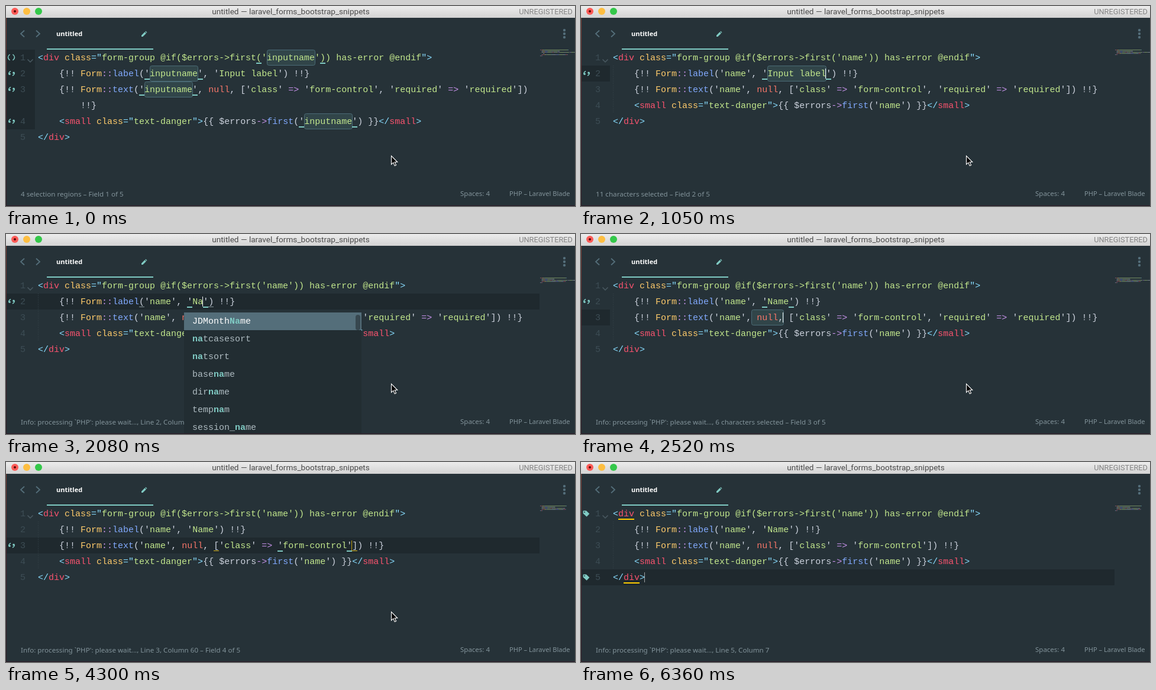
An HTML page that plays this animation: 962x339 px, repeating every 6460 ms.

```html
<!DOCTYPE html>
<html lang="en">
<head>
<meta charset="utf-8">
<title>Snippet fields in an editor</title>
<style>
html, body { margin: 0; width: 100%; height: 100%; overflow: hidden; background: #263238; }
svg { display: block; width: 962px; height: 339px; }
text { white-space: pre; }
.code { font: 15px "Liberation Mono", "Noto Sans Mono", monospace; fill: #cdd3de; }
.num { fill: #3d4d55; }
.ui { font: 11.65px "Noto Sans", "Open Sans", sans-serif; fill: #82939a; }
.bar { font: 13.6px Roboto, Inter, sans-serif; fill: #4b4b4b; }
.c { fill: #89ddff; } .r { fill: #f9536e; } .y { fill: #ffcb6b; } .g { fill: #c3e88d; }
.p { fill: #c792ea; } .b { fill: #82aaff; } .o { fill: #f77669; } .w { fill: #cdd3de; }
.teal { fill: #80cbc4; }
.hit { fill: #80cbc4; font-weight: bold; }
.sel { fill: #314549; stroke: #4b6b76; }
.line { fill: none; stroke: #546e7a; stroke-width: 1.8; }
</style>
</head>
<body>
<svg viewBox="0 0 962 339" xmlns="http://www.w3.org/2000/svg">
  <defs>
    <linearGradient id="chrome" x2="0" y2="1">
      <stop stop-color="#ececec"/><stop offset="1" stop-color="#d3d3d3"/>
    </linearGradient>
    <linearGradient id="edge" x2="0" y2="1">
      <stop stop-color="#7a3a30"/><stop offset="0.4" stop-color="#4a2028"/><stop offset="1" stop-color="#2a1824"/>
    </linearGradient>
    <g id="round" fill="none" stroke="#80cbc4" stroke-width="1.6">
      <path d="M6.5 8Q0.5 13 6.5 18M11.5 8Q17.5 13 11.5 18"/>
    </g>
    <g id="quote">
      <path d="M8 9.500Q4.700 11 4.700 14M11 17Q14.300 15.500 14.300 12.500" fill="none" stroke="#80cbc4" stroke-width="1.400"/>
      <circle class="teal" cx="6" cy="14.300" r="1.800"/><circle class="teal" cx="13" cy="12.200" r="1.800"/>
    </g>
    <g id="tag">
      <path class="teal" d="M3.500 9.500q0-1 1-1h4.300l5.500 5.300-4.700 4.900-6.100-5.400Z"/>
      <circle cx="6" cy="11" r="1" fill="#263238"/>
    </g>
  </defs>
  <rect width="962" height="339" fill="#263238"/>
  <rect width="962" height="20" fill="url(#chrome)"/>
  <circle cx="15" cy="9" r="6" fill="#fc5b57"/><circle cx="15" cy="9" r="2" fill="#5c0a08"/>
  <circle cx="35" cy="9" r="6" fill="#fdbe41"/>
  <circle cx="55" cy="9" r="6" fill="#34c84a"/>
  <text class="bar" x="481.500" y="14" text-anchor="middle">untitled — laravel_forms_bootstrap_snippets</text>
  <text class="bar" x="958" y="13.500" text-anchor="end" style="font-size:12.800px;fill:#858585">UNREGISTERED</text>
  <path class="line" d="M31 41.500L25 47L31 52.500M51 41.500L57 47L51 52.500"/>
  <text class="ui" x="85" y="51" style="font-size:11px;font-weight:600;fill:#fff">untitled</text>
  <path class="teal" d="M229 52v-2.300l5.600-5.600 2.300 2.300-5.600 5.600ZM235.300 43.400l.9-.9 2.300 2.300-.9.900Z"/>
  <rect class="teal" x="69" y="72" width="180" height="2"/>
  <g fill="#546e7a">
    <circle cx="944" cy="41" r="2.200"/><circle cx="944" cy="47" r="2.200"/><circle cx="944" cy="53" r="2.200"/>
  </g>
  <text class="ui" x="768" y="322" style="font-size:11.500px">Spaces: 4</text>
  <text class="ui" x="851" y="322" style="font-size:11.100px">PHP – Laravel Blade</text>
  <g id="view"></g>
  <rect y="20" width="1" height="319" fill="url(#edge)"/>
  <rect y="338" width="962" height="1" fill="#2a1824"/>
  <path id="mouse" d="M651.500 254v14.500l3.300-3.100 2.400 5.400 2.400-1-2.400-5.300h4.500Z" fill="#000" stroke="#fff" stroke-width="1.100"/>
</svg>
<script>
const LOOP = 6460, LEFT = 54, TOP = 74, CH = 9, ROW = 27, MINI = 0.65;
const INFO = "Info: processing `PHP': please wait..., ";
const NAME_COLS = [43, 21, 20, 50];
const YELLOW = '#d9b51c', GOLD = '#ffcc00', TEAL = '#80cbc4', GREY = '#87959b', WHITE = '#f4f6f7';
const view = document.getElementById('view');
const mouse = document.getElementById('mouse');

const esc = s => s.replace(/&/g, '&amp;').replace(/</g, '&lt;');
const px = col => LEFT + col * CH;
const py = row => TOP + row * ROW;
const rect = (x, y, w, h, attr) => `<rect x="${x}" y="${y}" width="${w}" height="${h}" ${attr}/>`;

// Each part of a line starts with the letter of its colour.
const parse = s => s.split('|').map(p => [p[0], p.slice(1)]);
const str = s => `w'|g${s}|w'`;

function codeLines({ name, label, req }) {
  const extra = req ? `|w, |${str('required')}|p => |${str('required')}` : '';
  const wrap = name === 'inputname';
  const rows = [
    `c<|rdiv|y class|c="|gform-group @if($errors->first('${name}')) has-error @endif|c">`,
    `w    {!! |yForm|p::|blabel|w(|${str(name)}|w, |${str(label)}|w) !!}`,
    `w    {!! |yForm|p::|btext|w(|${str(name)}|w, |onull|w, [|${str('class')}|p => |${str('form-control')}${extra}|w])` + (wrap ? '' : ' !!}'),
    `w    |c<|rsmall|y class|c="|gtext-danger|c">|w{{ $errors|p->|bfirst|w(|${str(name)}|w) }}|c</|rsmall|c>`,
    'c</|rdiv|c>'
  ];
  if (wrap) rows.splice(3, 0, 'w        !!}');
  return rows.map(parse);
}

function minimap(lines) {
  let out = '';
  lines.forEach((parts, row) => {
    let col = 0;
    for (const [color, s] of parts) {
      const pad = s.length - s.trimStart().length;
      out += rect(903 + (col + pad) * MINI, 74 + row * 2, (s.length - pad) * MINI, 1, `class="${color}" opacity=".5"`);
      col += s.length;
    }
  });
  return out;
}

function popup({ query, items }) {
  let out = rect(301, 133, 300, 206, 'fill="#222d32"') + rect(301, 133, 300, 30, 'fill="#546e7a"')
    + rect(591, 137, 8, 26, 'rx="4" fill="#37474f"');
  items.forEach((item, i) => {
    let at = item.indexOf(query);
    if (at < 0) at = item.indexOf(query.toLowerCase());
    const end = at + query.length;
    out += `<text class="code" x="315" y="${152 + i * 30}" style="fill:${i ? '#aebbc1' : '#fff'}">`
      + `${item.slice(0, at)}<tspan class="hit">${item.slice(at, end)}</tspan>${item.slice(end)}</text>`;
  });
  return out;
}

function draw(s) {
  const lines = codeLines(s), wrapped = lines.length > 5;
  let out = '';
  if (s.band) {
    const [row, count, full] = s.band;
    out += rect(0, py(row), full ? 902 : 49, count * ROW, 'fill="#1f292e"');
  }
  if (!wrapped) out += `<path d="M54.500 101V182" stroke="#35434a" stroke-dasharray="1 2"/>`;
  for (const [row, col, len] of s.sel || [])
    out += rect(px(col) + 0.5, py(row) + 0.5, len * CH, 26, 'rx="3" class="sel"');
  let num = 0;
  lines.forEach((parts, row) => {
    const y = py(row) + 18;
    if (!(wrapped && row === 3)) out += `<text class="code num" x="24" y="${y}">${++num}</text>`;
    out += `<text class="code" x="${LEFT}" y="${y}">`
      + parts.map(([c, t]) => `<tspan class="${c}">${esc(t)}</tspan>`).join('') + '</text>';
  });
  out += '<path d="M36.500 90.500L41 95L45.500 90.500" fill="none" stroke="#4a5a62" stroke-width="1.500"/>';
  for (const [row, col, color = TEAL, len = 1, thick = 2] of s.marks || [])
    out += rect(px(col), py(row) + 22, len * CH, thick, `fill="${color}"`);
  for (const [row, id] of s.icons || []) out += `<use href="#${id}" y="${py(row)}"/>`;
  for (const [row, col, color = WHITE, alpha = 1] of s.carets || [])
    out += rect(px(col) - 1, py(row) + 5, 1, 17, `fill="${color}" opacity="${alpha}"`);
  out += minimap(lines) + `<text class="ui" x="25" y="323">${s.status}</text>`;
  if (s.popup) out += popup(s.popup);
  view.innerHTML = out;
  mouse.style.display = s.noMouse ? 'none' : '';
}

const fourIcons = last => [[0, 'round'], [1, 'quote'], [2, 'quote'], [last, 'quote']];

// All four name fields at once, either selected or with carets after the typed text.
function multi(name, picked) {
  const rows = picked ? [0, 1, 2, 4] : [0, 1, 2, 3], n = name.length;
  const marks = [], sel = [], carets = [];
  rows.forEach((row, i) => {
    const col = NAME_COLS[i], gap = i ? 1 : 2;
    marks.push([row, col - gap], [row, col + n + gap - 1]);
    if (picked) sel.push([row, col, n]);
    else carets.push([row, col + n, GOLD]);
  });
  return { name, label: 'Input label', req: true, marks, sel, carets, icons: fourIcons(rows[3]),
    band: [0, picked ? 5 : 4, !picked], status: '4 selection regions – Field 1 of 5' };
}

const label = {
  name: 'name', label: 'Input label', req: true, band: [1, 1], sel: [[1, 29, 11]],
  carets: [[1, 40]], status: '11 characters selected – Field 2 of 5'
};
const quote = row => [[row, 'quote']];

function typed(text, items) {
  const end = 29 + text.length;
  return {
    name: 'name', label: text, req: true, band: [1, 1, true], carets: [[1, end]], icons: quote(1),
    marks: [[1, 28], [1, end], [1, 19, GREY, 1, 1], [1, end + 1, GREY, 1, 1]],
    status: `${items ? INFO : ''}Line 2, Column ${end + 1} – Field 2 of 5`,
    popup: items && { query: text, items: items.split(' ') }
  };
}

const done = { name: 'name', label: 'Name', req: true };
const nullField = {
  ...done, band: [2, 1], sel: [[2, 26, 6]], carets: [[2, 32]], icons: quote(1),
  marks: [[1, 28], [1, 33]], status: INFO + '6 characters selected – Field 3 of 5'
};
const reqField = {
  ...done, band: [2, 1], sel: [[2, 59, 26]], carets: [[2, 85]], icons: quote(1),
  status: INFO + '26 characters selected – Field 4 of 5'
};
const reqMarks = { icons: quote(2), marks: [[2, 75], [2, 84], [2, 33, YELLOW, 1, 1], [2, 85, YELLOW, 1, 1]] };

const cut = (alpha, lit = true) => ({
  ...done, req: false, band: [2, 1, true], carets: [[2, 59, GOLD, alpha]], icons: quote(2),
  marks: lit ? [[2, 45], [2, 58], [2, 33, YELLOW, 1, 1], [2, 59, YELLOW, 1, 1]] : [],
  status: INFO + 'Line 3, Column 60 – Field 4 of 5'
});
const last = alpha => ({
  ...done, req: false, band: [4, 1, true], carets: [[4, 6, WHITE, alpha]],
  icons: [[0, 'tag'], [4, 'tag']], marks: [[0, 1, GOLD, 3], [4, 2, GOLD, 3]],
  status: INFO + 'Line 5, Column 7'
});

const forN = 'hw_New_Document JDMonthName natcasesort natsort next ngettext nl2br';
const forNa = 'JDMonthName natcasesort natsort basename dirname tempnam session_name';
const forNam = 'JDMonthName basename dirname tempnam php_uname session_name posix_ttyname';
const forName = 'JDMonthName basename dirname php_uname session_name posix_ttyname session_module_name';

const steps = [
  [0, multi('inputname', true)],
  [150, multi('n')], [300, multi('na')], [450, multi('nam')], [600, multi('name')],
  [900, { ...label, icons: fourIcons(3) }],
  [1050, { ...label, icons: quote(1), marks: [[1, 28], [1, 40]] }],
  [1500, typed('N')], [1640, typed('N', forN)],
  [1940, typed('Na', forNa)], [2090, typed('Nam', forNam)], [2230, typed('Name', forName)],
  [2520, nullField], [2970, reqField], [3120, { ...reqField, ...reqMarks }],
  [3570, cut(1, false)], [3720, cut(1)], [3860, cut(0.6)], [4010, cut(0.2)], [4150, cut(0)], [4300, cut(0.7)],
  [4450, last(1)],
  [4750, last(0.6)], [4900, last(0.2)], [5040, last(0)], [5190, last(0.2)], [5340, last(0.6)], [5490, last(1)],
  [5790, last(0.6)], [5930, last(0.2)], [6080, last(0)], [6220, last(0.3)],
  [6360, { ...last(0.6), noMouse: true }]
];

let shown = -1;
function tick() {
  const t = performance.now() % LOOP;
  let i = steps.length - 1;
  while (steps[i][0] > t) i--;
  if (i !== shown) draw(steps[shown = i][1]);
  requestAnimationFrame(tick);
}
tick();
</script>
</body>
</html>
```
